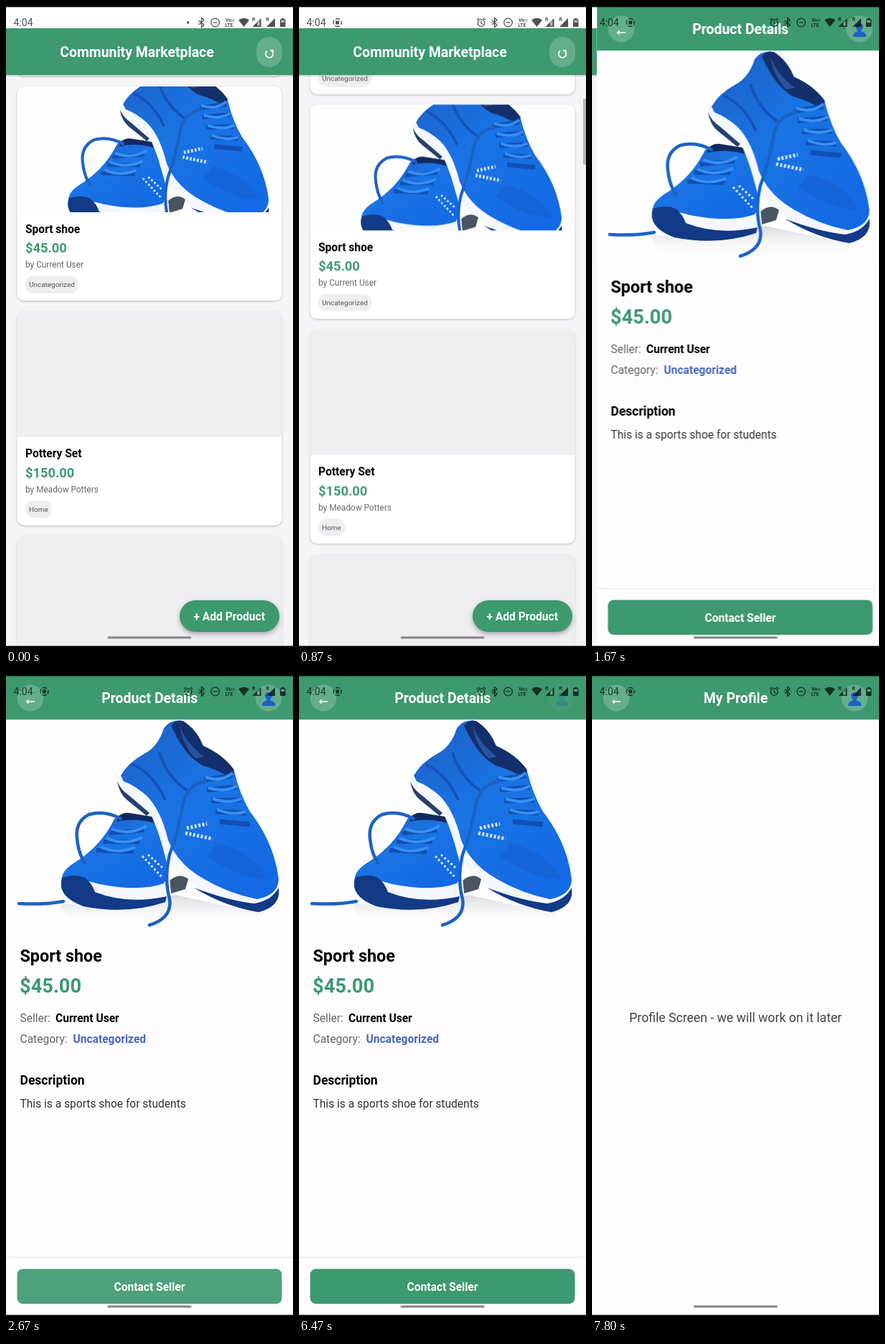
These frames come from a looping animation (400 px wide and 892 px high, 8000 ms). An HTML page:

```html
<!DOCTYPE html>
<html lang="en">
<head>
<meta charset="utf-8">
<title>Marketplace app</title>
<style>
html, body { margin: 0; width: 100%; height: 100%; overflow: hidden; background: #fff; }
svg { display: block; width: 100%; height: 100%; }
text { font-family: Roboto, "Noto Sans", sans-serif; font-size: 15.57px; fill: #000; }
.b { font-weight: 700; }
.mid { text-anchor: middle; }
.green { fill: #3d9970; }
.white { fill: #fff; }
.head { font-size: 19.46px; font-weight: 700; fill: #fff; text-anchor: middle; }
.price { font-size: 18.3px; font-weight: 700; fill: #3d9970; }
.by { font-size: 11.85px; fill: #666; }
.tag { font-size: 9.95px; fill: #555; }
.pill { fill: #eeedf0; }
.soft { fill: #fff; fill-opacity: .2; }
.line { fill: none; stroke: #fff; stroke-width: 1.6; }
.raised { filter: drop-shadow(0 1px 1.5px rgba(0,0,0,.24)); }
.float { filter: drop-shadow(0 3px 3px rgba(0,0,0,.3)); }

.strip, .scroll, .bar, .dim, .late, .early, .contact, .user { animation: 8s linear infinite; }
.strip { animation-name: strip; }
.scroll { animation-name: scroll; }
.bar { animation-name: bar; }
.dim { animation-name: dim; opacity: 0; }
.late { animation-name: late; }
.early { animation-name: early; }
.contact { animation-name: contact; }
.user { animation-name: user; }

@keyframes strip {
  0%, 16.1875% { transform: translateX(0); animation-timing-function: cubic-bezier(.37,0,.63,1); }
  21.3125%, 84.75% { transform: translateX(-400px); animation-timing-function: cubic-bezier(.37,0,.63,1); }
  89.875%, 100% { transform: translateX(-800px); }
}
@keyframes scroll {
  0%, .8% { transform: translateY(-25.3px); animation-timing-function: cubic-bezier(.3,.3,.4,1); }
  10.8%, 100% { transform: translateY(0); }
}
@keyframes bar {
  0%, .85% { opacity: 0; transform: translateY(2.9px); }
  .9% { opacity: 1; transform: translateY(2.9px); animation-timing-function: cubic-bezier(.3,.3,.4,1); }
  10.8%, 14.6% { opacity: 1; transform: translateY(0); }
  18%, 100% { opacity: 0; transform: translateY(0); }
}
@keyframes dim {
  0%, 14.9% { opacity: 0; }
  16.6%, 17.2% { opacity: .45; }
  19.6%, 100% { opacity: 0; }
}
@keyframes late { 0%, 4.99% { opacity: 0; } 5%, 100% { opacity: 1; } }
@keyframes early { 0%, 4.99% { opacity: 1; } 5%, 100% { opacity: 0; } }
@keyframes contact {
  0%, 33.2% { opacity: 1; }
  35%, 38.4% { opacity: .2; }
  41.5%, 100% { opacity: 1; }
}
@keyframes user {
  0%, 80.8% { opacity: 1; }
  80.85%, 82.4% { opacity: .2; }
  85.5%, 100% { opacity: 1; }
}
</style>
</head>
<body>
<svg viewBox="0 0 400 892" preserveAspectRatio="none">
<defs>
  <linearGradient id="blue" x1="0" y1="0" x2=".7" y2="1">
    <stop offset="0" stop-color="#1c5fc4"/>
    <stop offset=".5" stop-color="#1a74e4"/>
    <stop offset="1" stop-color="#146ae4"/>
  </linearGradient>
  <linearGradient id="floor" x1="0" y1="0" x2="0" y2="1">
    <stop offset="0" stop-color="#d8dae0"/>
    <stop offset="1" stop-color="#fff" stop-opacity="0"/>
  </linearGradient>
  <clipPath id="photo"><path d="M15.5 175V10a10 10 0 0 1 10-10h349a10 10 0 0 1 10 10v165z"/></clipPath>
  <clipPath id="hero"><rect width="400" height="292"/></clipPath>

  <!-- pair of shoes, 400 x 292 -->
  <g id="shoes">
    <rect width="400" height="292" fill="#fefefe"/>
    <path d="M75 256Q150 264 236 244L300 258 360 268 350 290H90z" fill="url(#floor)"/>
    <!-- rear shoe -->
    <path d="M156 78Q152 94 164 106L194 132Q206 146 212 176Q236 214 272 238Q316 260 352 267Q376 258 380 238L330 230 240 160 190 86z" fill="#f4f7fc"/>
    <path d="M155 86Q158 104 170 113L196 134 200 130 172 106Q160 98 155 86z" fill="#26406f"/>
    <path d="M262 234Q310 252 346 256Q370 252 380 234Q384 260 352 268Q304 260 262 234z" fill="#123a86"/>
    <path d="M220 12Q228 1 242 1Q264 10 274 36Q304 50 318 72Q326 104 340 128Q374 172 380 222Q380 244 350 250Q310 242 276 222Q240 202 226 168Q216 126 196 106Q180 92 164 86L160 78Q170 60 192 48Q212 38 220 12z" fill="url(#blue)"/>
    <path d="M230 8Q238 0 247 2Q266 14 275 37Q302 48 318 70L314 82Q296 70 274 64Q248 50 230 8z" fill="#14306c"/>
    <path d="M242 8Q250 32 276 52L264 54Q246 36 242 8z" fill="#27539f"/>
    <path d="M176 62Q206 76 222 112M214 46Q224 80 254 100" fill="none" stroke="#1254bb" stroke-width="4"/>
    <path d="M276 84L316 78M280 98L322 94M286 113L328 112M292 128L334 130M298 142L340 146" fill="none" stroke="#1150b4" stroke-width="7"/>
    <path d="M278 80Q300 88 316 74M282 95Q306 102 322 92M288 110Q310 118 328 110M294 125Q316 134 334 128" fill="none" stroke="#3790f4" stroke-width="4"/>
    <path d="M252 151l28-6M250 158l38 8" fill="none" stroke="#cfe5ff" stroke-width="5" stroke-dasharray="3 2.5"/>
    <path d="M296 172Q348 186 366 222Q326 222 280 190z" fill="#1560cf" opacity=".55"/>
    <!-- front shoe -->
    <path d="M228 224Q242 212 254 222L250 236 230 242z" fill="#4b5462"/>
    <path d="M78 222Q100 250 130 250Q190 262 230 242L228 220 130 214z" fill="#f4f7fc"/>
    <path d="M148 144Q154 130 168 132L204 136Q214 160 220 184Q230 214 220 228Q186 240 130 229Q100 220 78 224Q76 212 94 200Q130 178 148 144z" fill="url(#blue)"/>
    <path d="M154 142Q158 128 172 130L203 135 206 144Q180 136 154 142z" fill="#102a5e"/>
    <path d="M78 220Q96 214 110 220Q120 228 124 240Q170 258 224 246L222 254Q168 272 108 260Q70 246 78 220z" fill="#123a86"/>
    <path d="M144 158L192 154M136 170L186 170M126 182L178 184" fill="none" stroke="#1150b4" stroke-width="6"/>
    <path d="M148 152Q172 162 196 148M140 165Q164 176 190 164M132 177Q154 188 180 178" fill="none" stroke="#3790f4" stroke-width="4"/>
    <path d="M190 190l28 30M198 188l20 18" fill="none" stroke="#cfe5ff" stroke-width="3" stroke-dasharray="3 3"/>
    <!-- laces -->
    <g fill="none" stroke="#1c62c4" stroke-width="4.500" stroke-linecap="round">
      <path d="M160 138Q138 126 116 132Q96 142 99 166Q101 186 110 200"/>
      <path d="M278 86Q252 90 246 120Q240 156 228 188Q220 220 228 250Q232 276 200 286"/>
      <path d="M80 253Q54 258 18 256"/>
    </g>
  </g>

  <g id="card">
    <rect class="raised" x="15.5" width="369" height="298" rx="10" fill="#fff"/>
    <path d="M15.5 175V10a10 10 0 0 1 10-10h349a10 10 0 0 1 10 10v165z" fill="#eeedf0"/>
  </g>
  <g id="wide"><rect class="pill" x="27" y="263.5" width="74" height="24" rx="11"/><text class="tag" x="32" y="279">Uncategorized</text></g>

  <g id="topbar">
    <rect width="400" height="62" class="green"/>
    <circle class="soft" cx="34" cy="32" r="18.5"/>
    <path class="line" d="M40 37H29M31.500 34.500L29 37l2.500 2.500"/>
  </g>
  <g id="person">
    <circle class="soft" cx="366" cy="32" r="18.5"/>
    <path d="M357 43Q357 36.500 363.500 35.500L363.500 34Q361 31.500 361 28.500Q361 24 366 24T371 28.500Q371 31.500 368.500 34L368.500 35.500Q375.500 36.500 375.500 43z" fill="#1d60c4"/>
  </g>
  <g id="signal">
    <path d="M343.500 29L355.500 17V29z"/>
    <text x="343" y="21" class="b" style="font-size:7px">R</text>
  </g>
</defs>

<rect width="400" height="892" fill="#fefcff"/>
<g class="strip">
  <!-- product list -->
  <g>
    <rect width="400" height="892" fill="#f5f4f6"/>
    <g class="scroll">
      <g transform="translate(0 -175.200)"><use href="#card"/><use href="#wide"/></g>
      <g transform="translate(0 137.400)">
        <use href="#card"/>
        <g clip-path="url(#photo)"><use href="#shoes" transform="translate(15.500 -47.600) scale(.9225)"/></g>
        <text class="b" x="27" y="203.500">Sport shoe</text>
        <text class="price" x="27" y="231.300">$45.00</text>
        <text class="by" x="27" y="252.300">by Current User</text>
        <use href="#wide"/>
        <rect class="dim" x="15.500" width="369" height="298" rx="10" fill="#dfdee2"/>
      </g>
      <g transform="translate(0 450)">
        <use href="#card"/>
        <text class="b" x="27" y="203.500">Pottery Set</text>
        <text class="price" x="27" y="231.300">$150.00</text>
        <text class="by" x="27" y="252.300">by Meadow Potters</text>
        <rect class="pill" x="27" y="263.500" width="37" height="24" rx="11"/>
        <text class="tag" x="32" y="279">Home</text>
      </g>
      <use href="#card" transform="translate(0 763)"/>
    </g>
    <rect class="bar" x="396" y="129" width="4" height="91.500" fill="#b4b3b6"/>
    <rect width="400" height="31" fill="#fff"/>
    <rect class="green raised" y="31" width="400" height="65"/>
    <text class="head" x="182.500" y="71">Community Marketplace</text>
    <rect class="soft" x="349" y="43" width="36" height="42" rx="18"/>
    <path class="line" d="M364 62.500A5.200 5.200 0 1 0 370.500 62.800M368 61.800h4v4"/>
    <rect class="green float" x="242" y="827" width="139" height="44" rx="22"/>
    <text class="b white mid" x="311.200" y="855">+ Add Product</text>
  </g>

  <!-- product details -->
  <g transform="translate(400)">
    <rect width="400" height="892" fill="#fefcff"/>
    <use href="#topbar"/>
    <g class="user"><use href="#person"/></g>
    <text class="head" x="200.300" y="39">Product Details</text>
    <g transform="translate(0 62)" clip-path="url(#hero)"><use href="#shoes"/></g>
    <text class="b" x="19.500" y="399" style="font-size:23.35px">Sport shoe</text>
    <text class="price" x="19" y="442.300" style="font-size:27.25px">$45.00</text>
    <text x="19.500" y="483" fill-opacity=".6">Seller:</text>
    <text class="b" x="69" y="483">Current User</text>
    <text x="19.500" y="512" fill-opacity=".6">Category:</text>
    <text class="b" x="93.500" y="512" style="fill:#4a69bd">Uncategorized</text>
    <text class="b" x="19.500" y="570" style="font-size:17.5px">Description</text>
    <text x="19.500" y="602" style="fill:#333">This is a sports shoe for students</text>
    <rect y="810" width="400" height="1" fill="#e8e6ea"/>
    <g class="contact">
      <rect class="green" x="15.500" y="826.500" width="369" height="48.500" rx="8"/>
      <text class="b white mid" x="200" y="857">Contact Seller</text>
    </g>
  </g>

  <!-- profile -->
  <g transform="translate(800)">
    <rect width="400" height="892" fill="#fefcff"/>
    <use href="#topbar"/><use href="#person"/>
    <text class="head" x="200.300" y="39">My Profile</text>
    <text class="mid" x="200" y="483" style="font-size:17.65px;fill:#444">Profile Screen - we will work on it later</text>
  </g>
</g>

<!-- system bar -->
<g opacity=".69">
  <text x="10.500" y="28" style="font-size:14px">4:04</text>
  <circle class="early" cx="253.500" cy="23" r="1.800"/>
  <g class="late" fill="none" stroke="#000" stroke-width="1.300">
    <circle cx="53.500" cy="23" r="5.500" stroke-dasharray="6.640 2" stroke-dashoffset="3.300"/>
    <circle cx="53.500" cy="23" r="2" fill="#000"/>
    <circle cx="254" cy="23.500" r="4.800"/>
    <path d="M254 20.500v3.500l2.200 1.500M248 19.500l3-2.500M260 19.500l-3-2.500"/>
  </g>
  <g fill="none" stroke="#000" stroke-width="1.300">
    <path d="M269 20l7 6.500-3.500 3v-13l3.500 3-7 6.500M267.500 23h1M276.500 23h1"/>
    <circle cx="291.500" cy="23" r="5.800"/><path d="M288.500 23h6"/>
  </g>
  <g class="b"><text x="306" y="22" style="font-size:6.500px">Vo</text><text x="305.500" y="29" style="font-size:6.500px">LTE</text></g>
  <path d="M314.500 18q1.500 2 0 4M316.800 17.500q2 2.500 0 5" fill="none" stroke="#000" stroke-width=".8"/>
  <path d="M324 19.500Q331.500 14 339 19.500L331.500 29z"/>
  <use href="#signal"/><use href="#signal" x="19.500"/>
  <path d="M350 27.500v-4l3.500-3.500v7.500z" fill="#fff" opacity=".6"/>
  <path d="M382 18.500h2v-1.500h3.500v1.500h2V29H382z"/>
  <path d="M383.300 19.800h4.900v3.200h-4.900z" fill="#fff" opacity=".6"/>
</g>
<rect x="141.500" y="877.300" width="117" height="3.200" rx="1.600" fill="#8a898c"/>
<path d="M0 0h400v1.500H0zM0 890.500h400v1.500H0z"/>
</svg>
</body>
</html>
```
